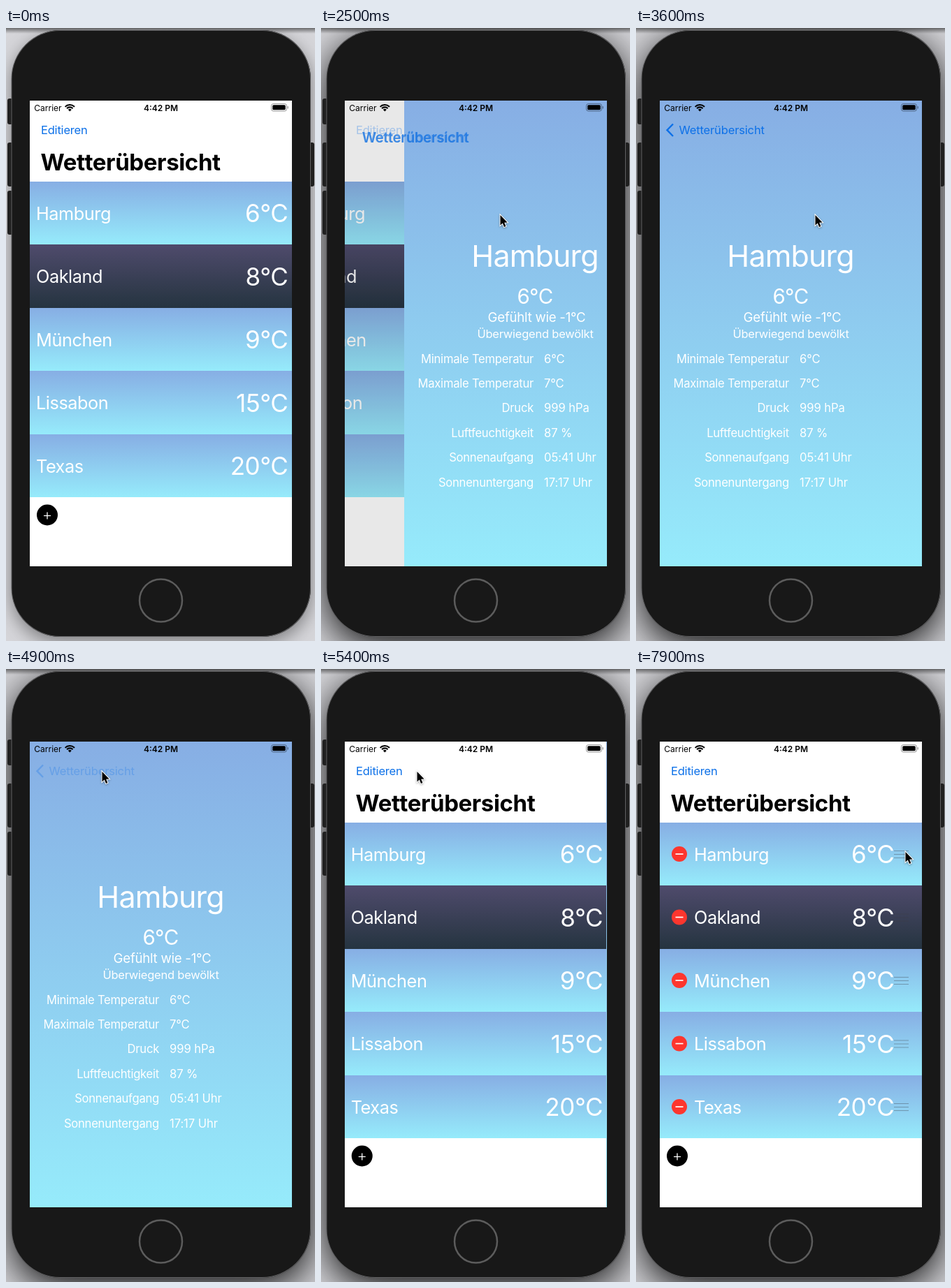
An HTML page with a canvas that plays this animation: 442x878 px, repeating every 8000 ms.

```html
<!DOCTYPE html>
<html lang="de">
<head>
<meta charset="utf-8">
<title>Wetterübersicht</title>
<style>
html, body { margin: 0; width: 442px; height: 878px; overflow: hidden; }
canvas { display: block; }
</style>
</head>
<body>
<canvas id="stage" width="442" height="878"></canvas>
<script>
const ctx = document.getElementById('stage').getContext('2d');
const LOOP = 8000, STEP = 100;
const X = 34, Y = 104, W = 375, H = 667;
const ROW_TOP = 220, ROW_H = 90.5;
const BLUE = '#0c70e8';
const SKY = ['#87aee4', '#96ebfb'], NIGHT = ['#4f4b6c', '#253440'];
const cities = [['Hamburg', 6], ['Oakland', 8], ['München', 9], ['Lissabon', 15], ['Texas', 20]];
const facts = [
  ['Minimale Temperatur', '6°C'], ['Maximale Temperatur', '7°C'], ['Druck', '999 hPa'],
  ['Luftfeuchtigkeit', '87 %'], ['Sonnenaufgang', '05:41 Uhr'], ['Sonnenuntergang', '17:17 Uhr']
];
// pointer stops: time, x, y
const path = [[700, 452, 330], [900, 408, 279], [1000, 398, 275], [1600, 256, 268],
  [3700, 256, 268], [4500, 137, 147], [5600, 137, 147], [6200, 90, 143],
  [7200, 90, 143], [7800, 385, 262]];

const clamp = v => Math.max(0, Math.min(1, v));
const mix = (a, b, p) => a + (b - a) * p;
const smooth = v => { v = clamp(v); return v * v * (3 - 2 * v); };
const spring = ms => { const k = Math.max(0, ms) * 0.018; return 1 - (1 + k) * Math.exp(-k); };

// y is the middle of the capital letters, track is in em
function text(s, x, y, size, { color = '#fff', weight = 400, align = 'left', track = -0.0145, alpha = 1 } = {}) {
  ctx.font = `${weight} ${size}px Inter, sans-serif`;
  ctx.letterSpacing = track * size + 'px';
  ctx.textAlign = align;
  ctx.fillStyle = color;
  ctx.globalAlpha = alpha;
  ctx.fillText(s, x, y + size * 0.364);
  ctx.globalAlpha = 1;
}

function rect(x, y, w, h, color, r = 0) {
  ctx.fillStyle = color;
  ctx.beginPath();
  ctx.roundRect(x, y, w, h, r);
  ctx.fill();
}

function disc(x, y, r, color) {
  ctx.fillStyle = color;
  ctx.beginPath();
  ctx.arc(x, y, r, 0, 7);
  ctx.fill();
}

function line(points, color, width) {
  ctx.strokeStyle = color;
  ctx.lineWidth = width;
  ctx.beginPath();
  points.forEach(p => ctx.lineTo(...p));
  ctx.stroke();
}

function shade(y, h, [from, to]) {
  const g = ctx.createLinearGradient(0, y, 0, y + h);
  g.addColorStop(0, from);
  g.addColorStop(1, to);
  return g;
}

function phone(active) {
  rect(0, 0, 442, 878, '#d6d6da');
  ctx.save();
  ctx.shadowColor = `rgba(0,0,0,${active ? 0.95 : 0.42})`;
  ctx.shadowBlur = active ? 56 : 26;
  ctx.shadowOffsetY = active ? 14 : 8;
  rect(8, 3, 428, 869, '#181818', 70);
  ctx.restore();
  rect(0, 0, 442, 8, shade(0, 8, ['rgba(0,0,0,.5)', 'rgba(0,0,0,0)']));
  for (const [x, y, h] of [[2, 101, 37], [2, 164, 63], [2, 233, 63], [433, 164, 63]])
    rect(x, y, 8, h, '#202020', 3);
  rect(7.5, 3, 428.5, 869, '#606062', 70);
  rect(8.5, 4, 426.5, 867, '#181818', 69);
  ctx.strokeStyle = '#5c5c5c';
  ctx.lineWidth = 2.5;
  ctx.beginPath();
  ctx.arc(221.5, 820, 30.5, 0, 7);
  ctx.stroke();
}

function list(edit) {
  rect(X, Y, W, H, '#fff');
  cities.forEach(([name, temp], i) => {
    const top = ROW_TOP + i * ROW_H, mid = top + 45.5;
    const y = Math.floor(top), h = Math.floor(top + ROW_H) - y;
    rect(X, y, W, h, shade(y, h, i === 1 ? NIGHT : SKY));
    text(name, 43 + 40 * edit, mid, 25.3, { track: -0.018 });
    text(temp + '°C', 403.5 - 34 * edit, mid, 35, { align: 'right', track: -0.012 });
    if (!edit) return;
    const x = mix(22, 62, edit);
    disc(x, mid - 0.5, 11, '#fd362e');
    rect(x - 5.5, mid - 1.3, 11, 1.7, '#fff');
    ctx.globalAlpha = edit;
    for (const d of [-5, 0, 5]) rect(369 + 40 * (1 - edit), mid + d - 0.5, 21, 1, 'rgba(60,60,67,.38)');
    ctx.globalAlpha = 1;
  });
  disc(59, 697.5, 15, '#000');
  line([[54, 698.5], [64, 698.5]], '#fff', 1.3);
  line([[59, 693.5], [59, 703.5]], '#fff', 1.3);
}

function detail() {
  rect(X, Y, W, H, shade(Y, H, SKY));
  const center = { align: 'center' };
  text('Hamburg', 221, 326.5, 43, { align: 'center', track: -0.02 });
  text('6°C', 221, 384, 29.5, { align: 'center', track: -0.02 });
  text('Gefühlt wie -1°C', 223.5, 414.5, 18.7, center);
  text('Überwiegend bewölkt', 221.5, 438, 16.5, center);
  facts.forEach(([label, value], i) => {
    const y = 473.5 + 35.45 * i;
    text(label, 219, y, 16.6, { align: 'right' });
    text(value, 234, y, 16.6, { track: -0.005 });
  });
}

// the large title shrinks into the back button as p goes to 1
function navigation(p, backAlpha, editAlpha) {
  const x = mix(50, 61.5, p), y = mix(192, 146, p), width = mix(257, 122, p);
  const c = clamp(p * 1.2);
  const color = `rgb(${12 * c},${112 * c},${232 * c})`;
  text('Editieren', 50, 146, 16.5, { color: BLUE, track: -0.012, alpha: editAlpha * (1 - p) ** 0.8 });
  text('Wetterübersicht', x - 0.5, y, 33 * width / 257,
    { color, weight: 700, track: -0.011, alpha: (1 - p ** 3) * backAlpha });
  if (p < 0.01) return;
  text('Wetterübersicht', x, y, 16.5 * width / 122, { color: BLUE, track: -0.009, alpha: p * p * backAlpha });
  ctx.globalAlpha = clamp(p * 5 - 4) * backAlpha;
  line([[53, 137.5], [44.5, 146.2], [53, 155]], BLUE, 2.4);
  ctx.globalAlpha = 1;
}

function statusBar() {
  text('Carrier', 40.3, 114.5, 12, { color: '#000', track: 0 });
  text('4:42 PM', 221.5, 114.5, 12, { color: '#000', weight: 600, align: 'center', track: 0 });
  ctx.strokeStyle = '#000';
  ctx.lineWidth = 2.1;
  for (const r of [5.8, 9.2]) {
    ctx.beginPath();
    ctx.arc(91.3, 119.2, r, -Math.PI * 0.76, -Math.PI * 0.24);
    ctx.stroke();
  }
  ctx.fillStyle = '#000';
  ctx.beginPath();
  ctx.moveTo(91.3, 119.6);
  ctx.arc(91.3, 119.2, 3.3, -Math.PI * 0.76, -Math.PI * 0.24);
  ctx.fill();
  ctx.strokeStyle = 'rgba(0,0,0,.4)';
  ctx.lineWidth = 1;
  ctx.beginPath();
  ctx.roundRect(379.5, 108.5, 22, 10.5, 3);
  ctx.stroke();
  rect(381.2, 110.2, 18.6, 7.1, '#000', 1.6);
  rect(402.7, 112, 1.2, 3.6, 'rgba(0,0,0,.4)', 1);
}

function pointer(t) {
  if (t < path[0][0]) return;
  let i = path.findIndex(stop => stop[0] > t);
  if (i < 0) i = path.length - 1;
  const [t0, x0, y0] = path[i - 1], [t1, x1, y1] = path[i];
  const p = i < 4 ? clamp((t - t0) / (t1 - t0)) : smooth((t - t0) / (t1 - t0));
  ctx.save();
  ctx.translate(mix(x0, x1, p), mix(y0, y1, p));
  ctx.beginPath();
  for (const q of [[0.5, 0], [0.5, 14.5], [3.8, 11.6], [6, 17], [8.4, 16], [6.2, 10.8], [10.6, 10.4]])
    ctx.lineTo(...q);
  ctx.closePath();
  ctx.shadowColor = 'rgba(0,0,0,.35)';
  ctx.shadowBlur = 3;
  ctx.shadowOffsetY = 1;
  ctx.strokeStyle = '#fff';
  ctx.lineWidth = 2;
  ctx.stroke();
  ctx.shadowColor = 'transparent';
  ctx.fillStyle = '#000';
  ctx.fill();
  ctx.restore();
}

function draw(t) {
  const p = t < 4945 ? spring(t - 2343) : 1 - spring(t - 4945);
  const edit = smooth((t - 6500) / 350);
  const backAlpha = t >= 4800 && t < 4945 ? 0.28 : 1;
  const editAlpha = t >= 6400 && t < 6600 ? 0.3 : 1;
  phone(t >= 2300);
  ctx.save();
  ctx.beginPath();
  ctx.rect(X, Y, W, H);
  ctx.clip();
  ctx.save();
  ctx.translate(-0.3 * W * p, 0);
  list(edit);
  ctx.restore();
  if (p > 0.001) {
    rect(X, Y, W, H, `rgba(0,0,0,${0.115 * p})`);
    ctx.save();
    ctx.translate(W * (1 - p), 0);
    detail();
    ctx.restore();
  }
  navigation(p, backAlpha, editAlpha);
  statusBar();
  ctx.restore();
  pointer(t);
}

function tick() {
  draw(Math.floor(performance.now() % LOOP / STEP) * STEP);
  requestAnimationFrame(tick);
}
tick();
</script>
</body>
</html>
```
